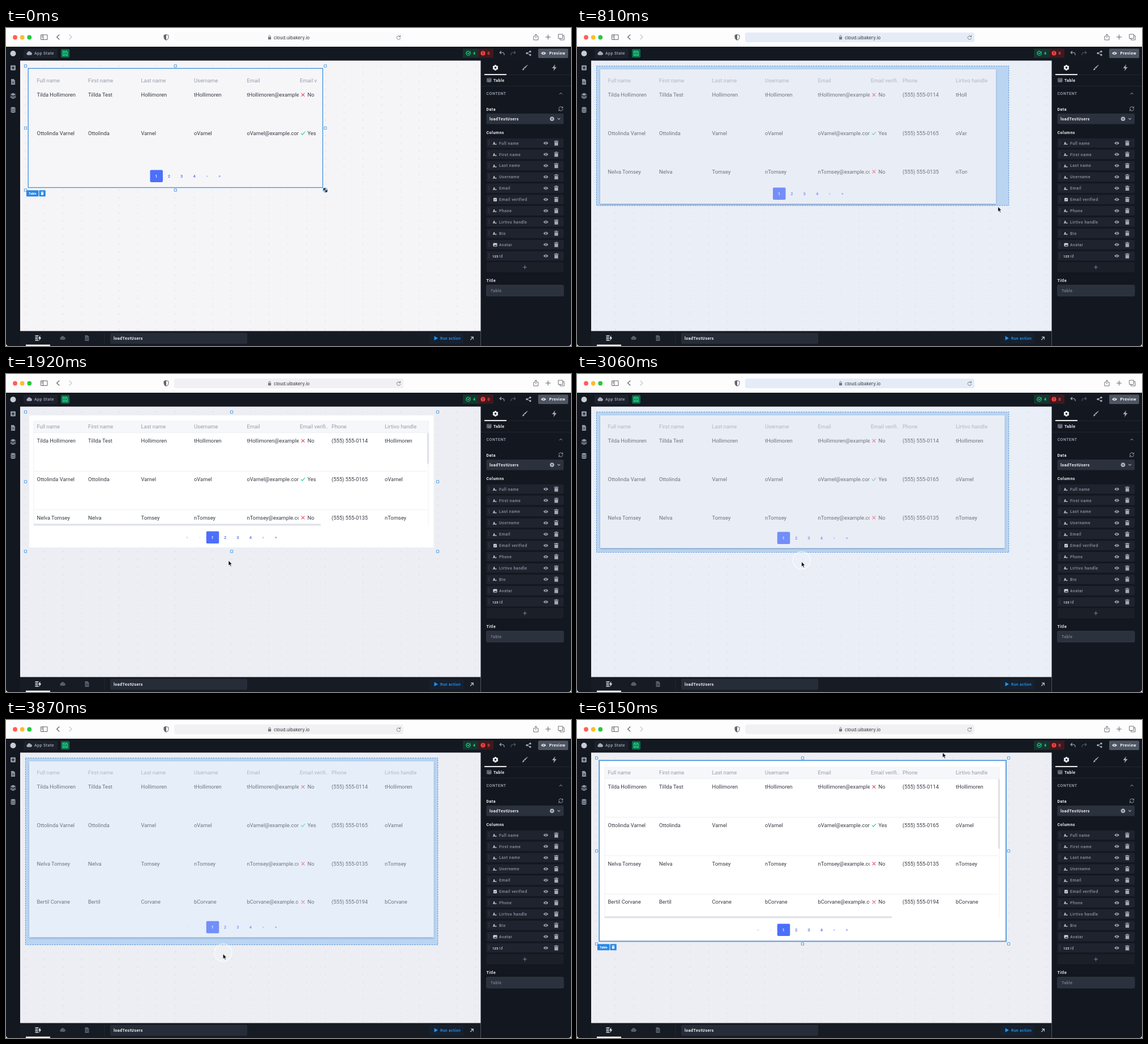
An HTML page for the animation above (6180 ms loop, 998x561 px).

```html
<!DOCTYPE html>
<html lang="en">
<head>
<meta charset="utf-8">
<title>Resizing a table</title>
<style>
html, body { margin: 0; width: 100%; height: 100%; overflow: hidden; background: #fff; }
svg { display: block; width: 100%; height: 100%; font-family: Roboto, "Open Sans", sans-serif; }
.ui { font-size: 7px; letter-spacing: .5px; font-weight: 500; }
.b { font-weight: 700; }
.mid { text-anchor: middle; }
.icon { fill: none; stroke-linecap: round; stroke-linejoin: round; }
.cell { font-size: 9.37px; fill: #363a45; }
.head { font-size: 9.37px; fill: #979ca8; }
</style>
</head>
<body>
<svg id="stage" viewBox="0 0 998 561" preserveAspectRatio="none"></svg>
<script>
const LOOP = 6180;
const COL = 33.1, ROW = 13.67, LEFT = 34.5, TOP = 67;
const svg = document.getElementById('stage');

const rect = (x, y, w, h, fill, more = '') =>
  `<rect x="${x}" y="${y}" width="${w}" height="${h}" fill="${fill}" ${more}/>`;
const text = (x, y, s, more = '') => `<text x="${x}" y="${y + 2.6}" ${more}>${s}</text>`;
const ui = (x, y, s, fill, cls = '') => text(x, y, s, `class="ui ${cls}" fill="${fill}"`);
const icon = (x, y, d, color, width = 1, more = '') =>
  `<path class="icon" transform="translate(${x} ${y})" d="${d}" stroke="${color}" stroke-width="${width}" ${more}/>`;
const solid = (x, y, d, color) => `<path transform="translate(${x} ${y})" d="${d}" fill="${color}"/>`;
const dot = (x, y, r, fill) => `<circle cx="${x}" cy="${y}" r="${r}" fill="${fill}"/>`;

const CLOUD = 'M-3 3.5A2.4 2.4 0 0 1-3.2-1 3.3 3.3 0 0 1 2.8-1.6 2.6 2.6 0 0 1 3 3.5Z';
const FILE = 'M-3.5-5H1L3.5-2.5V5H-3.5Z';
const BOLT = 'M1.5-6L-4 1H-.5L-1.5 6 4-1H.5Z';
const TRASH = 'M-4-3.7H-1.5V-4.6H1.5V-3.7H4V-2.6H-4ZM-3.2-1.8H3.2V4.4H-3.2Z';
const EYE = 'M-4.4 0Q0-5.2 4.4 0Q0 5.2-4.4 0Z';
const RELOAD = 'M2.8-1.8A3.3 3.3 0 1 0 3.2 1M3-4V-1.5H.6';
const PLUS = 'M-3 0H3M0-3V3';
const DOWN = 'M-2-1L0 1 2-1';

function eye(x, y, color, hole) {
  return solid(x, y, EYE, color) + dot(x, y, 1.6, hole) + dot(x, y, .8, color);
}

function browserBar() {
  const c = '#63656b';
  return rect(0, 0, 998, 33, '#fdfdfe') +
    dot(16, 16.5, 3.9, '#fe5f57') + dot(28.7, 16.5, 3.9, '#febc2e') + dot(41.3, 16.5, 3.9, '#28c840') +
    icon(67.5, 16, 'M-5.5-4H5.5V4.4H-5.5ZM-2-4V4.4M-4.2-2H-3.4M-4.2 0H-3.4', c) +
    icon(92, 16, 'M2-4L-2.3 0 2 4', c, 1.2) + icon(114, 16, 'M-2-4L2 0-2 4', '#c6c7cb', 1.2) +
    icon(283, 16.5, 'M0-5L4-3.5V0Q4 3.5 0 5Q-4 3.5-4 0V-3.5Z', c) +
    solid(283, 16.5, 'M0-5L-4-3.5V0Q-4 3.5 0 5Z', c) +
    '<rect id="address" x="297" y="8" width="405" height="17" rx="4"/>' +
    rect(463, 15.8, 5.2, 4.4, '#77797f', 'rx=".8"') + icon(465.6, 15.5, 'M-1.5 0V-1A1.5 1.5 0 0 1 1.5-1V0', '#77797f', .9) +
    text(473, 17, 'cloud.uibakery.io', 'font-family="Inter, sans-serif" font-size="7.7" font-weight="500" fill="#4d4e53"') +
    icon(693.5, 17, RELOAD, '#77797f', .9) +
    icon(936, 16, 'M-2-1.5H-4V5H4V-1.5H2M0 1.5V-5M-2-3.2L0-5 2-3.2', c, .9) +
    icon(957.5, 16, 'M-4 0H4M0-4V4', c) +
    icon(981, 16, 'M-5-5H2.4V2.4H-5ZM-2.4 2.4V5H5V-2.4H2.4', c, .9);
}

function appBar() {
  const c = '#a6adba';
  return rect(0, 33, 998, 24.5, '#141820') +
    rect(31, 37, 60, 16, '#1c212b', 'rx="2"') + solid(41, 44.3, CLOUD, c) + ui(50, 44.2, 'App State', c) +
    rect(97, 37.3, 15.2, 15, '#0b6b4a', 'rx="2"') +
    icon(104.5, 44.8, 'M-4-4H2.5L4-2.5V4H-4ZM-2-4V-1.3H1.6V-4M-2 4V1.3H2V4', '#2adf8c', 1.1) +
    rect(807, 36.5, 27, 16, '#14352f') + rect(834, 36.5, 27, 16, '#40191f') +
    icon(816.5, 44.5, 'M3.6-1A3.7 3.7 0 1 1 1.6-3.3M-1.6-.4L0 1.2 3.8-2.8', '#2bd88a', 1.1) + ui(825, 44.5, '4', '#2bd88a', 'b') +
    dot(842.5, 44.5, 4, '#f2443f') + rect(842, 42, 1.1, 3, '#40191f') + rect(842, 45.8, 1.1, 1.1, '#40191f') +
    ui(850.5, 44.5, '0', '#f2544d', 'b') +
    icon(876, 44.5, 'M-1.5-3.5L-4-1.2-1.5 1M-4-1.2H1.2Q4-1 4 3', c, 1.1) +
    icon(896, 44.5, 'M1.5-3.5L4-1.2 1.5 1M4-1.2H-1.2Q-4-1-4 3', '#545b68', 1.1) +
    icon(923, 44.5, 'M3-3L-3 0 3 3', c) + dot(926, 41.5, 1.7, c) + dot(920, 44.5, 1.7, c) + dot(926, 47.5, 1.7, c) +
    rect(940, 36.5, 53, 16.5, '#4e5562', 'rx="2"') + eye(949.5, 44.5, '#f4f6f9', '#4e5562') + ui(959.5, 44.3, 'Preview', '#f4f6f9', 'b');
}

function leftRail() {
  const c = '#8e96a5', back = '#131720';
  return rect(0, 57, 25, 504, back) +
    rect(8, 65.7, 9, 9, c, 'rx="1.4"') + icon(12.5, 70.2, 'M-2.3 0H2.3M0-2.3V2.3', back, 1.2) +
    solid(12.5, 95, FILE, c) + icon(12.5, 95, 'M-1.8 0H1.8M-1.8 2H1.8', back, .7) +
    solid(12.5, 119.5, 'M0-5L5-2.4 0 .2-5-2.4Z', c) + icon(12.5, 119.5, 'M-4.4.3L0 2.6 4.4.3M-4.4 2.6L0 4.9 4.4 2.6', c, 1.2) +
    rect(8.2, 139.5, 8.6, 10, c, 'rx="3"') + icon(12.5, 144.5, 'M-4.3-1.7Q0 .2 4.3-1.7M-4.3 1.5Q0 3.4 4.3 1.5', back, .9);
}

function columnRow(name, i) {
  const y = 203 + i * 19.9, c = '#a3aab7', back = '#1e232d';
  const kind = name === 'Id'
    ? text(859, y + .4, '123', 'font-size="6" font-weight="700" fill="#d5d9e0"')
    : name === 'Email verified'
    ? rect(861, y - 2.7, 6, 6, '#d5d9e0', 'rx=".8"') + icon(864, y + .3, 'M-1.6 0L-.4 1.2 1.7-1.2', back, .9)
    : name === 'Avatar'
    ? rect(860.5, y - 2.5, 7, 5.8, '#d5d9e0', 'rx=".8"') + solid(864, y + .5, 'M-2.6 2L-1 0 0 1 1.4-.9 2.8 2Z', back)
    : text(860, y + .4, 'A<tspan font-size="4.2">z</tspan>', 'font-size="6.6" font-weight="900" fill="#d5d9e0"');
  return rect(848.5, y - 8.3, 136.5, 16.6, back, 'rx="2"') +
    icon(853, y, 'M0-4V4', '#3c4350', 1.3, 'stroke-dasharray="1 2"') + kind + ui(871, y, name, '#8f97a6') +
    eye(953.5, y, c, back) + solid(972, y, TRASH, c);
}

function rightPanel() {
  const light = '#eef0f4', grey = '#a3aab7', box = '#2c323d', back = '#131720', rule = '#242a35';
  const names = ['Full name', 'First name', 'Last name', 'Username', 'Email', 'Email verified',
    'Phone', 'Lirtivo handle', 'Bio', 'Avatar', 'Id'];
  let petals = '';
  for (let i = 0; i < 6; i++) petals += dot(864.5 + 3.2 * Math.sin(i * 1.047), 70 + 3.2 * Math.cos(i * 1.047), 1.9, light);
  return rect(838.5, 57, 159.5, 504, back) + petals + dot(864.5, 70, 1.4, back) +
    solid(916.5, 70, 'M4.5-5L5-4.4 0 1.5-1.8-.2ZM-2.2.6L-.7 2Q-1.2 5-5 4.3Q-3.6 3.4-3.6 2Q-3.4.8-2.2.6Z', grey) +
    solid(968.5, 70, BOLT, grey) + rect(839, 82.3, 159, .8, rule) + rect(845, 81.2, 39, 1.9, '#fff') +
    icon(853.5, 92, 'M-3.3-3H3.3V3H-3.3ZM-3.3-1H3.3M-3.3 1H3.3M-1-1V3M1.2-1V3', grey, .8) + ui(861, 92, 'Table', light, 'b') +
    rect(839, 102, 159, .8, rule) + ui(848.5, 115.5, 'CONTENT', grey) + icon(980, 115.5, 'M-2.2 1L0-1 2.2 1', grey) +
    ui(848.5, 143, 'Data', light, 'b') + icon(980, 142.5, 'M-3.5-.5A3.5 3.5 0 0 1 3-2M3.5-3.5V-1.5H1.5M3.5.5A3.5 3.5 0 0 1-3 2M-3.5 3.5V1.5H-1.5', grey, .9) +
    rect(848.5, 151, 136.5, 18.5, box, 'rx="2"') + ui(854, 160, 'loadTestUsers', light, 'b') +
    dot(964.5, 160.3, 3.8, '#b3b9c4') + icon(964.5, 160.3, 'M-1.3-1.3L1.3 1.3M1.3-1.3L-1.3 1.3', box) + icon(976.5, 160.3, DOWN, grey, 1.1) +
    ui(848.5, 184, 'Columns', light, 'b') + names.map(columnRow).join('') +
    rect(848.5, 413, 136.5, 18, '#1a1f28', 'rx="2"') + icon(916.5, 422, PLUS, '#7d8594') +
    ui(848.5, 445, 'Title', light, 'b') +
    rect(848.5, 453.5, 136.5, 19.5, box, 'rx="2" stroke="#3a414d" stroke-width=".6"') + ui(856, 463.5, 'Table', '#7d8594');
}

function bottomBar() {
  const c = '#565e6c', back = '#171c24';
  return rect(25, 534.6, 813.5, 26.4, back) +
    icon(54, 547, 'M-2-4H3M-2-1.4H2M-2 1.3H2M-2 4H3', '#e4e7ec', 1.4) + solid(59.5, 547, 'M1-5L-2.6.8H-.4L-1 5 2.8-1H.6Z', '#e4e7ec') +
    rect(35, 558.6, 43, 2.4, '#fff') + solid(100, 546.5, CLOUD, c) +
    solid(143, 547, FILE, c) + icon(143, 547, 'M-1.8 0H1.8M-1.8 2H1.8', back, .7) + rect(173.5, 538, .8, 20, '#262c37') +
    rect(184, 538, 242, 19, '#272d38', 'rx="2"') + ui(190, 547, 'loadTestUsers', '#eef0f4', 'b') +
    rect(748, 538.5, 60, 18, '#162130', 'rx="2"') + solid(759.5, 547.3, 'M-3-3.7L3.4 0-3 3.7Z', '#1e96f5') +
    text(767, 547, 'Run action', 'font-size="6.6" letter-spacing=".45" font-weight="700" fill="#1e8ce8"') +
    icon(823, 547.5, 'M-2.5 2.5L2.3-2.3M-1.6-2.4H2.4V1.6', '#c6cbd4', 1.1);
}

const columnX = [54.5, 145, 238.5, 332, 425.5, 519, 575, 669];
const headers = ['Full name', 'First name', 'Last name', 'Username', 'Email', 'Email verifi..', 'Phone', 'Lirtivo handle'];
// full name, first name, last name, user name, verified, phone
const people = [
  ['Tilda Hollimoren', 'Tillda Test', 'Hollimoren', 'tHollimoren', false, '(555) 555-0114'],
  ['Ottolinda Varnel', 'Ottolinda', 'Varnel', 'oVarnel', true, '(555) 555-0165'],
  ['Nelva Tomsey', 'Nelva', 'Tomsey', 'nTomsey', false, '(555) 555-0135'],
  ['Bertil Corvane', 'Bertil', 'Corvane', 'bCorvane', false, '(555) 555-0194']
];
const rowY = i => 118 + i * 67.75;

function personRow([full, first, last, user, verified, phone], i) {
  const y = rowY(i) + .6;
  const put = (col, s) => text(columnX[col], y, s, 'class="cell"');
  const mark = verified
    ? icon(524.5, y - .6, 'M-3.2.2L-1 2.5 3.3-2.4', '#3fcf8e', 1.2)
    : icon(524.5, y - .8, 'M-2.5-2.5L2.5 2.5M2.5-2.5L-2.5 2.5', '#ee4b5a', 1.1);
  return put(0, full) + put(1, first) + put(2, last) + put(3, user) +
    `<g clip-path="url(#mailClip)">${put(4, user + '@example.com')}</g>` + mark +
    text(532.5, y, verified ? 'Yes' : 'No', 'class="cell"') + put(6, phone) + put(7, user);
}

function pager() {
  const label = (s, i, fill) =>
    text(-78.4 + i * 22.4, 0, s, `class="mid" font-size="7.6" font-weight="500" fill="${fill}"`);
  return rect(-44.5, -10.5, 22.5, 21.4, '#4c6ffb', 'rx="2"') +
    `<g id="back">${label('«', 0, '#c9cdda')}${label('‹', 1, '#c9cdda')}</g>` + label('1', 2, '#fff') +
    ['2', '3', '4', '›', '»'].map((s, i) => label(s, i + 3, '#5470ea')).join('');
}

svg.innerHTML = `<defs>
  <pattern id="dots" patternUnits="userSpaceOnUse" x="${LEFT - 1}" y="${TOP - 1}" width="${COL}" height="${ROW}">
    <circle cx="1" cy="1" r=".65" fill="#c8cbd4"/></pattern>
  <clipPath id="mailClip"><rect x="425" y="60" width="92" height="400"/></clipPath>
  <clipPath id="headClip"><rect id="headBox" x="41" y="76" height="28"/></clipPath>
  <clipPath id="bodyClip"><rect id="bodyBox" x="41" y="104"/></clipPath>
  <clipPath id="window"><path d="M0 0H998V556Q998 561 993 561H5Q0 561 0 556Z"/></clipPath>
  <filter id="shade" x="-5%" y="-5%" width="110%" height="115%"><feDropShadow dx="0" dy="1.5" stdDeviation="1.5" flood-color="#54749e" flood-opacity=".55"/></filter>
</defs>
<g clip-path="url(#window)">
  <rect id="canvas" x="25" y="57" width="814" height="478"/>
  ${rect(25, 57, 814, 478, 'url(#dots)')}
  <rect id="ghost" x="${LEFT}" y="${TOP}" fill="#bad5f1" stroke="#5a94d6" stroke-width="1" stroke-dasharray="2.5 1.8"/>
  <rect id="card" x="41" y="73"/>
  <g id="lines">
    ${rect(49, 82, 697.5, 21.5, '#f6f7fa')}
    <path id="grid" fill="none" stroke="#eceef3" stroke-width=".9"/>
    <rect id="thumbY" x="743.8" y="104" width="3.4" fill="#dfe2ea" rx="1"/>
    <rect id="thumbX" x="49" width="507" height="3.2" fill="#dfe2ea" rx="1"/>
  </g>
  <g id="content">
    <g clip-path="url(#headClip)">${headers.map((s, i) => text(columnX[i], 93.2, s, 'class="head"')).join('')}</g>
    <g clip-path="url(#bodyClip)">${people.map(personRow).join('')}</g>
  </g>
  <g id="pager">${pager()}</g>
  <rect id="outline" x="39.2" y="71.3" fill="none" stroke="#3f92e0"/>
  <path id="handles" fill="#fff" stroke="#4b97e0" stroke-width="1"/>
  <g id="tag">${rect(36, 0, 21.5, 11, '#2a88e6', 'rx="1"')}
    ${text(46.8, 5, 'Table', 'class="mid b" font-size="5.6" fill="#fff"')}
    ${rect(58.5, 0, 11.3, 11, '#2a88e6', 'rx="1"')}
    <path transform="translate(64 5.5) scale(.65)" d="${TRASH}" fill="#fff"/></g>
  ${leftRail()}${rightPanel()}${appBar()}${dot(12.5, 45, 5, '#c6cbd4')}${bottomBar()}${browserBar()}
  <circle id="press" r="15.5" fill="#fff" fill-opacity=".22" stroke="#fff" stroke-width="1.5"/>
  <g id="resize">${dot(0, 0, 4.6, '#a9cdf2')}${icon(0, 0, 'M-2.6-2.6L2.6 2.6M-2.8.2V-2.8H.2M2.8-.2V2.8H-.2', '#16181d', 1.2)}</g>
  <path id="arrow" d="M0 0V9.2L2.1 7.3 3.6 10.6 5.1 9.9 3.7 6.7H6.5Z" fill="#0c0d10" stroke="#fff" stroke-width=".7"/>
</g>`;

const el = {};
svg.querySelectorAll('[id]').forEach(node => el[node.id] = node);
const set = (id, attrs) => { for (const k in attrs) el[id].setAttribute(k, attrs[k]); };
const show = (id, on) => el[id].style.display = on ? '' : 'none';

// Eased value through [time, value] stops.
function at(t, ...stops) {
  if (t <= stops[0][0]) return stops[0][1];
  for (let i = 1; i < stops.length; i++) {
    const [t0, a] = stops[i - 1], [t1, b] = stops[i];
    if (t <= t1) {
      const p = (t - t0) / (t1 - t0);
      return a + (b - a) * p * p * (3 - 2 * p);
    }
  }
  return stops[stops.length - 1][1];
}

const snap = (v, start, step) => start + Math.round((v - start) / step) * step;

function draw(t) {
  const first = t >= 60 && t < 1080, second = t >= 2950 && t < 4250;
  const drag = first || second, fresh = t < 60;
  const selected = fresh || t >= 4250;
  const blue = first || (second && t < 3180);

  const right = fresh ? 557 : first ? at(t, [60, 557], [720, 740]) : 755.5;
  const bottom = fresh ? 279 : first ? at(t, [60, 279], [720, 310])
    : t < 2950 ? 306 : second ? at(t, [2950, 306], [3060, 307], [3450, 345.5], [3950, 386]) : 388;
  const frameR = drag ? snap(right + 7, LEFT, COL) : right + 7;
  const frameB = drag ? snap(bottom + 7, TOP, ROW) + (second ? 1.5 : 0) : bottom + 7;
  const bodyR = fresh ? 549 : first ? at(t, [60, 549], [800, 689]) : 747;
  const bodyB = bottom - 39;

  set('address', { fill: fresh ? '#fbfbfc' : blue ? '#e5ecf8' : '#f1f1f4' });
  set('canvas', { fill: fresh ? '#f5f5f8' : blue ? '#e9eef7' : '#edeef3' });
  set('card', {
    width: right - 41, height: bottom - 73,
    fill: fresh ? '#f6f6f9' : !drag ? '#fff' : blue ? '#e9edf6' : '#e6eff9',
    filter: drag ? 'url(#shade)' : 'none'
  });
  show('ghost', drag);
  set('ghost', { width: frameR - LEFT, height: frameB - TOP });

  show('lines', !drag && !fresh);
  let grid = `M49 103.7H746M49 82V${bodyB}M746 82V${bodyB}`;
  for (let i = 0; i < 3; i++) {
    const y = 171.5 + i * 67.9;
    if (y < bodyB) grid += `M49 ${y}H744`;
  }
  set('grid', { d: grid });
  const track = bodyB - 104;
  set('thumbY', { height: track * track / 488 });
  set('thumbX', { y: bodyB - 2.8 });

  set('content', { opacity: drag ? .68 : 1 });
  set('headBox', { width: right - 49 });
  set('bodyBox', { width: bodyR - 41, height: bodyB - 104 });
  set('pager', { transform: `translate(${(41 + right) / 2} ${bottom - 18})`, opacity: drag ? .75 : 1 });
  set('back', { opacity: fresh ? 0 : drag ? .4 : 1 });

  show('outline', selected);
  set('outline', { width: frameR - 43.7, height: frameB - 75.8, 'stroke-width': fresh ? 1.3 : 1.6 });
  show('handles', !drag);
  const midX = (LEFT + frameR) / 2, midY = (TOP + frameB) / 2;
  set('handles', {
    d: [[LEFT, TOP], [midX, TOP], [frameR, TOP], [LEFT, midY], [frameR, midY], [LEFT, frameB], [midX, frameB], [frameR, frameB]]
      .map(([x, y]) => `M${x - 2.1} ${y - 2.1}h4.2v4.2h-4.2z`).join('')
  });
  show('tag', selected);
  set('tag', { transform: `translate(0 ${frameB + .2})` });

  const x = at(t, [60, 564], [720, 743.5], [1080, 743.5], [1750, 393], [2700, 393], [3060, 396.5], [3450, 386.5], [3950, 383], [5050, 383], [6050, 645.8]);
  const y = at(t, [60, 286], [720, 315], [1080, 315], [1750, 329], [2700, 329], [3060, 331], [3450, 378], [3950, 415], [4250, 415], [4750, 397.5], [5050, 397.5], [6050, 57.3]);
  show('resize', fresh);
  set('resize', { transform: `translate(${x} ${y})` });
  show('arrow', !fresh);
  set('arrow', { transform: `translate(${x} ${y})` });
  show('press', second);
  set('press', { cx: x + .3, cy: y - 2, opacity: at(t, [2950, 0], [3060, .7], [4100, .7], [4250, 0]) });
}

function tick(now) {
  draw(now % LOOP);
  requestAnimationFrame(tick);
}
draw(0);
requestAnimationFrame(tick);
</script>
</body>
</html>
```
